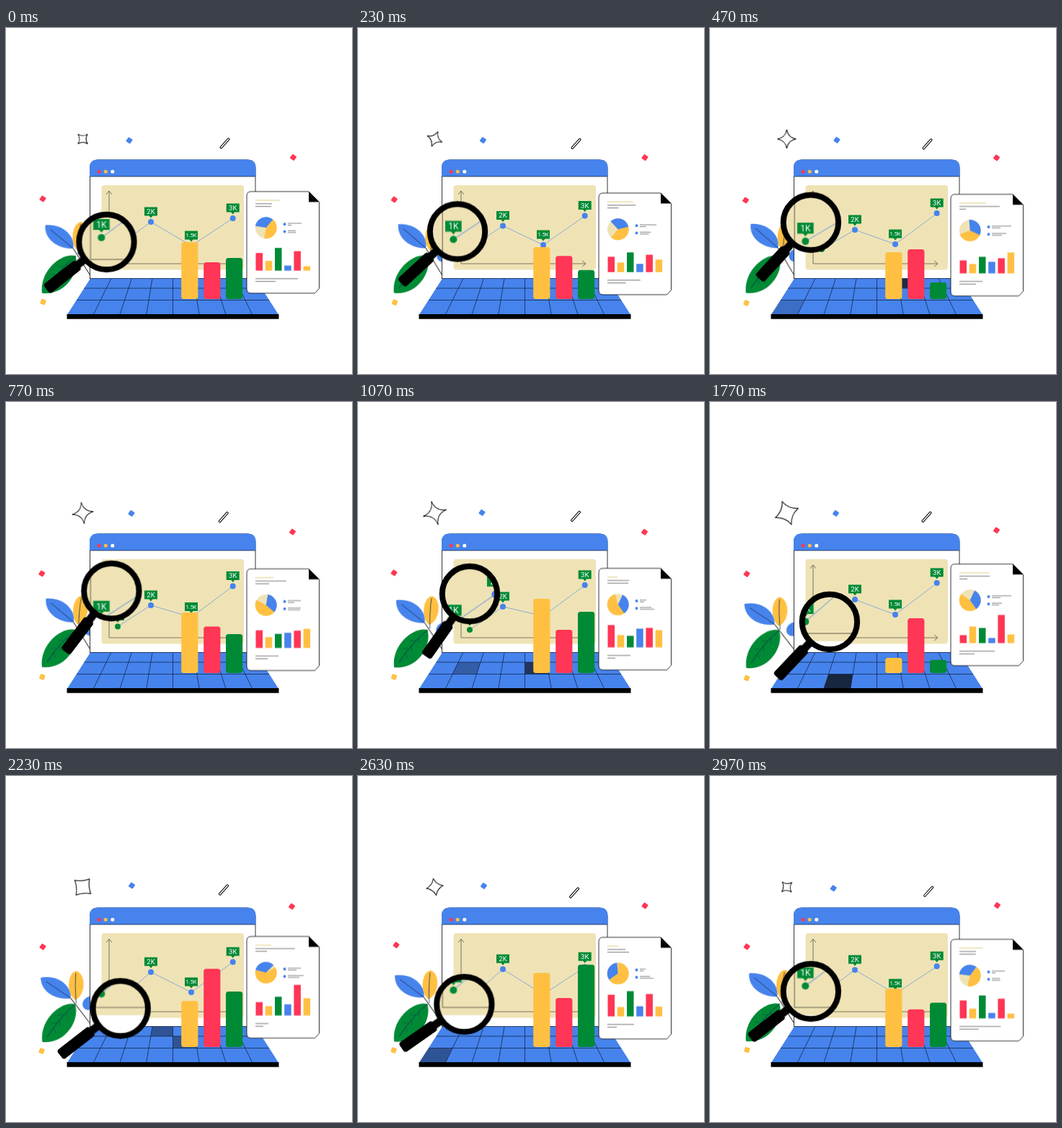
An HTML page without scripts for the animation above (3000 ms loop, 480 by 480 pixels).

```html
<!DOCTYPE html>
<html lang="en">
<head>
<meta charset="utf-8">
<title>Analytics</title>
<style>
html, body { margin: 0; width: 100%; height: 100%; overflow: hidden; background: #fff; }
svg { display: block; width: 100vw; height: 100vh; }
:root { --blue: #4683ec; --green: #008a35; --yellow: #ffc042; --red: #ff3655; --sand: #efe3b6; }
.blue { fill: var(--blue); } .green { fill: var(--green); } .yellow { fill: var(--yellow); }
.red { fill: var(--red); } .sand { fill: var(--sand); }
.ink { fill: none; stroke: #000; stroke-width: 1; }
.thin { fill: none; stroke: #12294f; stroke-width: .8; }
.axis { fill: none; stroke: #5f5a48; stroke-width: .8; }
text { font-family: Roboto, Arial, sans-serif; font-size: 9.5px; fill: #fff; text-anchor: middle; }

/* smooth back-and-forth motion */
.sway { animation: sway 1.5s cubic-bezier(.364, 0, .636, 1) var(--d) infinite alternate; }
@keyframes sway { from { transform: var(--from); } to { transform: var(--to); } }
.lx { --d: -2.78s; --from: translateX(138px); --to: translateX(166px); }
.ly { --d: -2.18s; --from: translateY(262px); --to: translateY(323px); }
.lx.back { --from: translateX(-138px); --to: translateX(-166px); }
.ly.back { --from: translateY(-262px); --to: translateY(-323px); }
.grip { --d: -.4s; --from: rotate(145deg); --to: rotate(125deg); }
.card { --d: -2.23s; --from: translateY(4.5px); --to: translateY(-4.5px); }
.leaf { --d: -2.55s; --from: rotate(2deg); --to: rotate(-5.5deg); transform-origin: 118px 345px; }
.big.leaf { --from: rotate(.4deg); --to: rotate(-1deg); }

/* stepped values a to f, shared by many parts */
.w, .h { transform-box: fill-box; transform-origin: 0 100%; }
.w { animation: wide 3s linear infinite; fill: #777; }
.h { animation: high 3s linear infinite; }
.m { animation: move 3s linear infinite; }
.bar { animation: bar 3s linear infinite; }
.pie { animation: pie 3s linear infinite; fill: none; stroke-width: 15; }
@keyframes wide {
  0%, 100% { scale: var(--a) 1; } 15.67% { scale: var(--b) 1; } 35.67% { scale: var(--c) 1; }
  59% { scale: var(--d) 1; } 74.33% { scale: var(--e) 1; } 87.67% { scale: var(--f) 1; }
}
@keyframes high {
  0%, 100% { scale: 1 var(--a); } 15.67% { scale: 1 var(--b); } 35.67% { scale: 1 var(--c); }
  59% { scale: 1 var(--d); } 74.33% { scale: 1 var(--e); } 87.67% { scale: 1 var(--f); }
}
@keyframes move {
  0%, 100% { translate: var(--a); } 15.67% { translate: var(--b); } 35.67% { translate: var(--c); }
  59% { translate: var(--d); } 74.33% { translate: var(--e); } 87.67% { translate: var(--f); }
}
@keyframes bar {
  0%, 100% { y: var(--a); height: calc(376px - var(--a)); }
  15.67% { y: var(--b); height: calc(376px - var(--b)); }
  35.67% { y: var(--c); height: calc(376px - var(--c)); }
  59% { y: var(--d); height: calc(376px - var(--d)); }
  74.33% { y: var(--e); height: calc(376px - var(--e)); }
  87.67% { y: var(--f); height: calc(376px - var(--f)); }
}
@keyframes pie {
  0%, 100% { rotate: 40deg; stroke-dasharray: 150 360; }
  15.67% { rotate: 105deg; stroke-dasharray: 145 360; }
  35.67% { rotate: 145deg; stroke-dasharray: 200 360; }
  59% { rotate: 145deg; stroke-dasharray: 160 360; }
  74.33% { rotate: 60deg; stroke-dasharray: 225 360; }
  87.67% { rotate: 0deg; stroke-dasharray: 235 360; }
}
.pie.top { animation-name: top; stroke-dasharray: 120 360; }
@keyframes top {
  0%, 100% { rotate: -80deg; } 15.67% { rotate: -5deg; } 35.67%, 59% { rotate: 25deg; }
  74.33% { rotate: -75deg; } 87.67% { rotate: -125deg; }
}

.k1 { --a: 0 303px; --b: 0 307px; --c: 0 316px; --d: 0 314px; --e: 0 312px; --f: 0 308px; }
.k2 { --a: 0 269px; --b: 0 280px; --c: 0 284px; --d: 0 274px; --e: 0 272px; --f: 0 268px; }
.k15 { --a: 0 302px; --b: 0 300px; --c: 0 297px; --d: 0 295px; --e: 0 300px; --f: 0 303px; }
.k3 { --a: 0 264px; --b: 0 257px; --c: 0 254px; --d: 0 251px; --e: 0 258px; --f: 0 265px; }
.plot { fill: none; stroke: #6f9fd8; stroke-width: .8; animation: plot 3s linear infinite; }
@keyframes plot {
  0%, 100% { d: path("M155 303L201 269L257 302L315 264"); }
  15.67% { d: path("M155 307L201 280L257 300L315 257"); }
  35.67% { d: path("M155 316L201 284L257 297L315 254"); }
  59% { d: path("M155 314L201 274L257 295L315 251"); }
  74.33% { d: path("M155 312L201 272L257 300L315 258"); }
  87.67% { d: path("M155 308L201 268L257 303L315 265"); }
}

.star { animation: star 3s linear infinite; vector-effect: non-scaling-stroke; }
@keyframes star {
  0% { transform: rotate(-45deg) scale(9.5); }
  15.67% { transform: rotate(-90deg) scale(13); }
  35.67% { transform: rotate(-106deg) scale(17); d: path("M0 -1Q.1 -.1 1 0Q.1 .1 0 1Q-.1 .1 -1 0Q-.1 -.1 0 -1Z"); }
  59% { transform: rotate(-112deg) scale(17); }
  74.33% { transform: rotate(-140deg) scale(14.5); d: path("M0 -1Q.36 -.36 1 0Q.36 .36 0 1Q-.36 .36 -1 0Q-.36 -.36 0 -1Z"); }
  87.67% { transform: rotate(-190deg) scale(11.5); }
  100% { transform: rotate(-225deg) scale(9.5); }
}

.key { fill: #141c2c; opacity: 0; animation: flash 3s linear var(--d) infinite; }
@keyframes flash { 0%, 14%, 100% { opacity: 0; } 7% { opacity: var(--o); } }
</style>
</head>
<body>
<svg viewBox="0 0 480 480">
  <defs>
    <clipPath id="glass"><circle r="36"/></clipPath>
    <g id="panel">
      <rect class="sand" x="132.500" y="218" width="197.500" height="117.500" rx="4"/>
      <path class="axis" d="M143 226V327H316M139 231L143 226L147 231M311 323L316 327L311 331"/>
    </g>
    <path id="tag" class="green" d="M-9 -20.500H9V-8.500H2.500L0 -5.500L-2.500 -8.500H-9Z"/>
    <rect id="chip" x="-3.500" y="-3.500" width="7" height="7" rx="1"/>
  </defs>

  <!-- confetti -->
  <g transform="translate(106.500 154)"><path class="ink star" d="M0 -1Q.18 -.18 1 0Q.18 .18 0 1Q-.18 .18 -1 0Q-.18 -.18 0 -1Z"/></g>
  <g class="m blue" style="--a:171px 156px;--b:176px 155.500px;--c:172px 153.500px;--d:174.500px 154.500px;--e:174.500px 152px;--f:174.500px 152.500px"><use href="#chip" transform="rotate(35)"/></g>
  <g class="m red" style="--a:51px 237px;--b:49.500px 239px;--c:50px 237px;--d:51px 238.500px;--e:51px 237px;--f:53px 234.500px"><use href="#chip" transform="rotate(35)"/></g>
  <g class="m red" style="--a:398.500px 179.500px;--b:397.500px 180px;--c:397.500px 180.500px;--d:397.500px 178px;--e:396.500px 181px;--f:398px 180px"><use href="#chip" transform="rotate(35)"/></g>
  <g class="m yellow" style="--a:51.500px 380px;--b:50.500px 381.500px;--c:50px 381.500px;--d:51px 383px;--e:49.500px 381.500px;--f:49.500px 380.500px"><use href="#chip" transform="rotate(20)"/></g>
  <g class="m" style="--a:303.500px 160px;--b:301.500px 161px;--c:302px 158.500px;--d:300.500px 159.500px;--e:302px 158px;--f:300px 162px"><rect class="ink" x="-9" y="-1.300" width="18" height="2.600" rx="1" transform="rotate(-48)"/></g>

  <!-- plant -->
  <g class="sway leaf">
    <ellipse class="blue" cx="119" cy="315" rx="11" ry="9" transform="rotate(-30 119 315)"/>
    <path class="blue" d="M93 306C96 289 78 271 54 274C52 293 72 308 93 306Z"/>
    <path class="yellow" d="M99 309C87 299 91 270 104 269C117 274 115 303 99 309Z"/>
    <path class="thin" d="M61 280L93 306M103 272Q100 290 100 314"/>
    <path class="ink" d="M93 306L118 345"/>
  </g>
  <g class="sway big leaf">
    <path class="green" d="M96.500 316C77 311 46 337 50 368C80 372 103 341 96.500 316Z"/>
    <path class="thin" d="M96.500 316Q73 336 57 361"/>
    <path class="thin" opacity=".5" d="M84 327L85 335M74 337L75 346M66 347L68 355M80 331L72 331M70 342L62 342"/>
  </g>

  <!-- laptop -->
  <path d="M116.500 348V194Q116.500 183 127.500 183H335Q346 183 346 194V348Z" fill="#fff" stroke="#000" stroke-width=".8"/>
  <path class="blue" d="M116 206V194Q116 182.500 127.500 182.500H335Q346.500 182.500 346.500 194V206Z"/>
  <path class="thin" d="M116.500 206H346"/>
  <circle class="red" cx="129" cy="199.300" r="2.500"/>
  <circle class="yellow" cx="138.300" cy="199.300" r="2.500"/>
  <circle fill="#fff" cx="147.800" cy="199.300" r="2.500"/>
  <path class="blue" d="M117 347.500H346L378 397.500H85Z"/>
  <g>
    <path class="key" style="--d:-2.740s;--o:.2" d="M98 377.500H131L122 397H85Z"/>
    <path class="key" style="--d:-.580s;--o:.45" d="M98 377.500H131L122 397H85Z"/>
    <path class="key" style="--d:-2.740s;--o:.85" d="M260 348H289L293 361H262Z"/>
    <path class="key" style="--d:-2.140s;--o:.36" d="M139 361H170L164.600 377.500H131Z"/>
    <path class="key" style="--d:-2.140s;--o:.75" d="M231.500 361H262L265 377.500H231.500Z"/>
    <path class="key" style="--d:-.980s;--o:.45" d="M231.500 361H262L265 377.500H231.500Z"/>
    <path class="key" style="--d:-1.440s;--o:.9" d="M164.600 377.500H198L195 397H158Z"/>
    <path class="key" style="--d:-.980s;--o:.45" d="M203 348H231.500V361H201Z"/>
  </g>
  <path class="thin" d="M117 347.500H346M108.500 361H354.500M98 377.500H365M145.600 348L121.600 397M174.200 348L158.200 397M202.900 348L194.900 397M231.500 348V397M260 348L268 397M288.800 348L304.800 397M317.400 348L341.400 397"/>
  <rect x="84.500" y="397" width="294" height="6.700"/>

  <!-- chart -->
  <use href="#panel"/>
  <path class="plot" d="M155 303L201 269L257 302L315 264"/>
  <g transform="translate(155 0)"><g class="m k1"><circle class="green" r="4"/><use href="#tag"/><text y="-11">1K</text></g></g>
  <g transform="translate(201 0)"><g class="m k2"><circle class="blue" r="4"/><use href="#tag"/><text y="-11">2K</text></g></g>
  <g transform="translate(257 0)"><g class="m k15"><circle class="blue" r="4"/><use href="#tag"/><text y="-11.700" style="font-size:7.500px">1.5K</text></g></g>
  <g transform="translate(314.700 0)"><g class="m k3"><circle class="blue" r="4"/><use href="#tag"/><text y="-11">3K</text></g></g>
  <rect class="bar yellow" x="243.200" width="23.200" rx="3.500" style="--a:297px;--b:311px;--c:273px;--d:355px;--e:312px;--f:273px"/>
  <rect class="bar red" x="274.200" width="23.200" rx="3.500" style="--a:325px;--b:307px;--c:316px;--d:300px;--e:267.500px;--f:308px"/>
  <rect class="bar green" x="305" width="23.200" rx="3.500" style="--a:319px;--b:353px;--c:291px;--d:358px;--e:299px;--f:261.500px"/>

  <!-- report -->
  <g class="sway card"><g transform="translate(0 227)">
    <path d="M340 0H420L434.500 14.500V134.500L428.500 141H340Q334 141 334 135V6Q334 0 340 0Z" fill="#fff" stroke="#000" stroke-width=".8"/>
    <path d="M420 0V14.500H434.500Z"/>
    <rect class="w" x="346" y="11.500" width="1" height="1.400" style="--a:34;--b:37;--c:14;--d:41;--e:22;--f:15;fill:#eadca6"/>
    <rect class="w" x="346" y="16.400" width="1" height="1" style="--a:23;--b:56;--c:30;--d:42;--e:55;--f:25"/>
    <rect class="w" x="346" y="20.200" width="1" height="1" style="--a:22;--b:9;--c:29;--d:11;--e:16;--f:30"/>
    <g transform="translate(360.700 50.300) rotate(-90)">
      <circle class="sand" r="14.800"/>
      <circle class="pie" r="7.500" pathLength="360" stroke="#ffc042"/>
      <circle class="pie top" r="7.500" pathLength="360" stroke="#4683ec"/>
    </g>
    <circle class="blue" cx="386.500" cy="45.200" r="2"/>
    <circle class="blue" cx="386.500" cy="55.500" r="2"/>
    <rect class="w" x="391" y="43.600" width="1" height=".9" style="--a:19;--b:27;--c:9;--d:27;--e:18;--f:8"/>
    <rect class="w" x="391" y="46.200" width="1" height=".9" style="--a:5;--b:12;--c:6;--d:12;--e:12;--f:5"/>
    <rect class="w" x="391" y="53.800" width="1" height=".9" style="--a:11;--b:20;--c:16;--d:14;--e:22;--f:14"/>
    <rect class="w" x="391" y="56.400" width="1" height=".9" style="--a:11;--b:14;--c:20;--d:10;--e:16;--f:19"/>
    <rect class="h red" x="346.500" y="108.700" width="9.500" height="1" style="--a:24.500;--b:18;--c:31;--d:11;--e:18.500;--f:30"/>
    <rect class="h yellow" x="359.700" y="108.700" width="9.500" height="1" style="--a:13.500;--b:13;--c:17;--d:23;--e:13;--f:13"/>
    <rect class="h green" x="373" y="108.700" width="9.500" height="1" style="--a:31.500;--b:23;--c:16;--d:21;--e:26;--f:35"/>
    <rect class="h blue" x="386.200" y="108.700" width="9.500" height="1" style="--a:7;--b:16;--c:26;--d:7;--e:15.500;--f:14"/>
    <rect class="h red" x="399.400" y="108.700" width="9.500" height="1" style="--a:27;--b:21;--c:27;--d:39;--e:42.500;--f:31"/>
    <rect class="h yellow" x="412.600" y="108.700" width="9.500" height="1" style="--a:6;--b:29;--c:24;--d:12;--e:24;--f:13.500"/>
    <rect class="w" x="346" y="120.400" width="1" height="1" style="--a:59;--b:32;--c:32;--d:49;--e:18;--f:37"/>
    <rect class="w" x="346" y="124.200" width="1" height="1" style="--a:28;--b:23;--c:11;--d:21;--e:11;--f:13"/>
  </g></g>

  <!-- magnifier: enlarged chart stays put while the glass moves -->
  <g class="sway lx"><g class="sway ly">
    <g clip-path="url(#glass)"><g class="sway ly back"><g class="sway lx back">
      <rect x="80" y="200" width="150" height="180" fill="#fff"/>
      <g transform="matrix(1.26 0 0 1.26 -63 -91)">
        <use href="#panel"/>
        <path class="plot" d="M155 303L201 269L257 302L315 264"/>
        <g transform="translate(155 0)"><g class="m k1"><circle class="green" r="4"/><use href="#tag"/><text y="-11">1K</text></g></g>
        <g transform="translate(201 0)"><g class="m k2"><circle class="blue" r="4"/><use href="#tag"/><text y="-11">2K</text></g></g>
      </g>
    </g></g></g>
    <circle r="38.200" fill="none" stroke="#000" stroke-width="8"/>
    <g class="sway grip">
      <rect x="40" y="-5.500" width="16" height="11"/>
      <rect x="50" y="-8" width="56" height="16" rx="4"/>
    </g>
  </g></g>
</svg>
</body>
</html>
```
